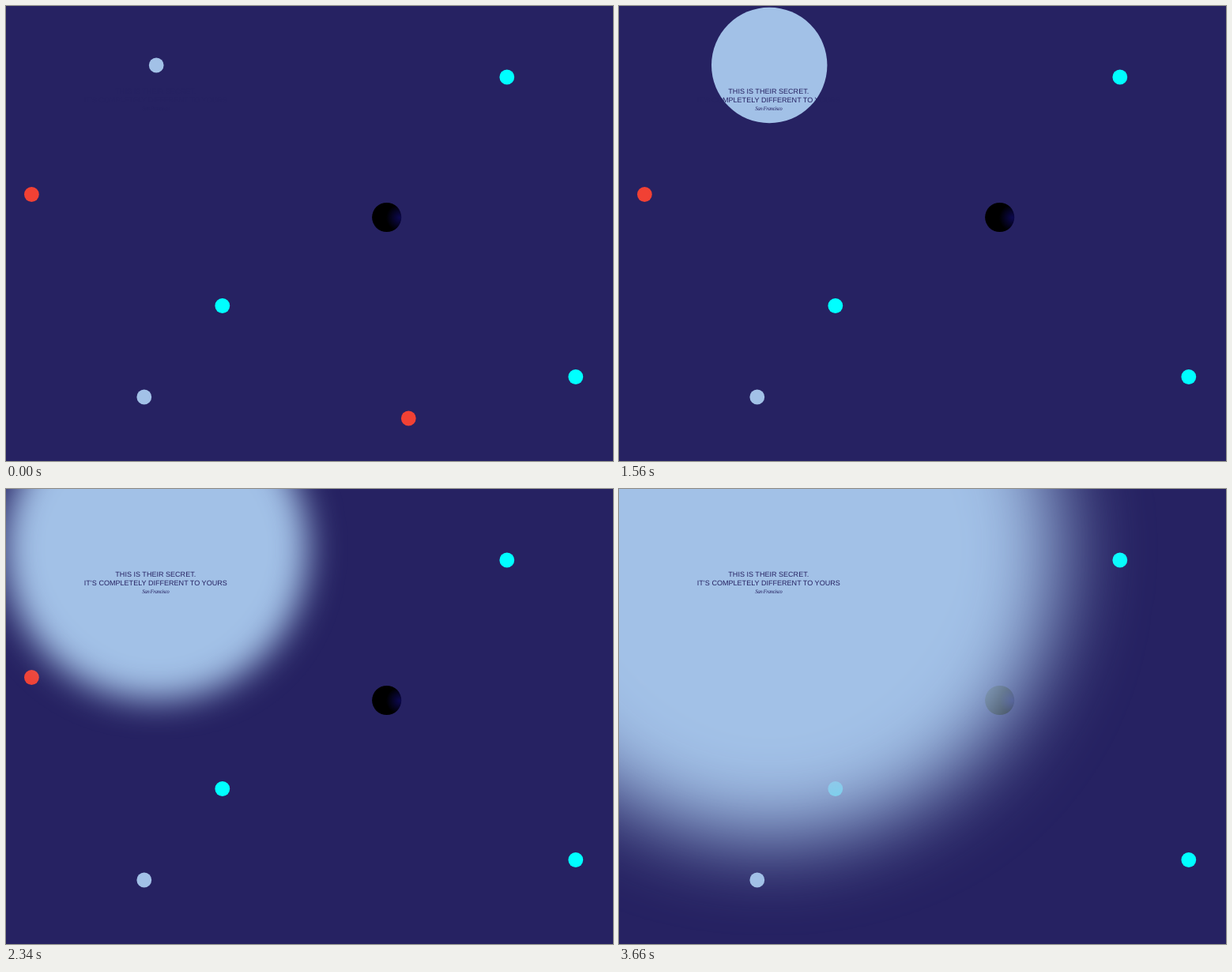
An HTML page that plays this animation: 768 px wide and 576 px high, repeating every 5.28 s.

```html
<!DOCTYPE html>
<html lang="en">
<head>
<meta charset="utf-8">
<title>Secret</title>
<style>
  html, body { margin: 0; width: 100%; height: 100%; overflow: hidden; background: #262262; }
  svg { display: block; width: 768px; height: 576px; }
  .cyan { fill: #0ff; }
  .red { fill: #f14134; }
  .pale { fill: #a2c1e7; }
  text {
    fill: #262262; text-anchor: middle; text-rendering: geometricPrecision;
    font: 9.05px "Liberation Sans", Arial, sans-serif;
  }
  .place { font: italic 7px "Liberation Serif", "Times New Roman", serif; letter-spacing: -.5px; }
</style>
</head>
<body>
<svg viewBox="0 0 768 576">
  <defs>
    <radialGradient id="shade" gradientUnits="userSpaceOnUse" cx="498" cy="268" r="17">
      <stop offset="0" stop-color="#0c0850"/>
      <stop offset="1" stop-color="#000"/>
    </radialGradient>
  </defs>
  <circle class="cyan" cx="633.8" cy="90" r="9.4"/>
  <circle class="cyan" cx="273.8" cy="379.5" r="9.4"/>
  <circle class="cyan" cx="720.8" cy="469.5" r="9.4"/>
  <circle class="red" cx="32.4" cy="238.5" r="9.4"/>
  <circle class="red" id="fleeting" cx="509.3" cy="522" r="9.4"/>
  <circle class="pale" cx="174.8" cy="495" r="9.4"/>
  <circle fill="url(#shade)" cx="481.7" cy="267.5" r="18.6"/>
  <circle class="pale" id="glow" cx="190.2" cy="75" r="9.4"/>
  <!-- Coloured like the backdrop, so the glow uncovers it -->
  <text x="189.3" y="110.6">THIS IS THEIR SECRET.</text>
  <text x="189.3" y="121.6">IT’S COMPLETELY DIFFERENT TO YOURS</text>
  <text class="place" x="189.3" y="132">San Francisco</text>
</svg>
<script>
  const LOOP = 5280, STEP = 30, RED_GONE = 1080;
  const radius = [[330, 9.4], [870, 18.4], [1290, 36.8], [1410, 51], [1770, 106],
                  [2010, 147], [2340, 192], [3180, 301], [3660, 368]];
  const blur = [[1690, 0], [2010, 11], [2340, 21.5], [3180, 46], [3660, 52]];
  const glow = document.getElementById('glow');
  const fleeting = document.getElementById('fleeting');

  function slope(keys, i) {
    const a = keys[Math.max(i - 1, 0)], b = keys[Math.min(i + 1, keys.length - 1)];
    return (b[1] - a[1]) / (b[0] - a[0]);
  }

  // Smooth curve through [time, value] keys, held at both ends
  function curve(keys, t) {
    const last = keys.length - 1;
    if (t <= keys[0][0]) return keys[0][1];
    if (t >= keys[last][0]) return keys[last][1];
    const i = keys.findIndex(k => k[0] > t) - 1;
    const [t0, v0] = keys[i], [t1, v1] = keys[i + 1];
    const d = t1 - t0, u = (t - t0) / d, w = 1 - u;
    return v0 * w * w * (1 + 2 * u) + v1 * u * u * (3 - 2 * u)
         + d * u * w * (slope(keys, i) * w - slope(keys, i + 1) * u);
  }

  const start = performance.now();

  function draw(now) {
    const elapsed = Math.max(0, now - start) % LOOP;
    const t = Math.floor(elapsed / STEP) * STEP;
    const sigma = curve(blur, t);
    glow.setAttribute('r', t < 360 ? 9.4 : curve(radius, t));
    glow.style.filter = sigma > 0 ? `blur(${sigma}px)` : 'none';
    fleeting.style.display = t < RED_GONE ? '' : 'none';
    requestAnimationFrame(draw);
  }
  draw(start);
</script>
</body>
</html>
```
